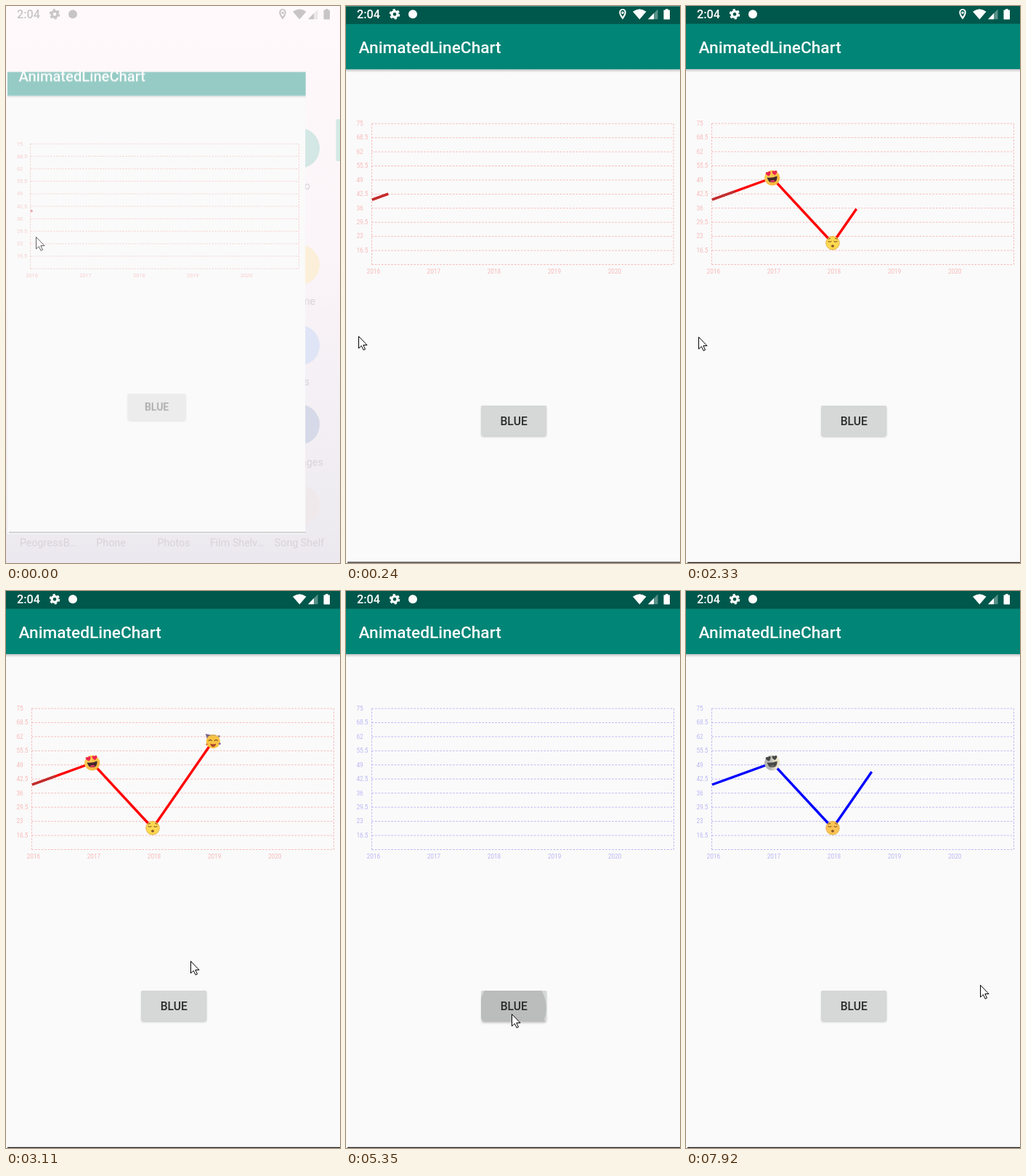
These frames come from a looping animation (460x768 px, 7990 ms). An HTML page:

```html
<!DOCTYPE html>
<html lang="en">
<head>
<meta charset="utf-8">
<title>Animated line chart</title>
<style>
  html, body { margin: 0; width: 100%; height: 100%; overflow: hidden; background: #fafafa; }
  svg { display: block; width: 100vw; height: 100vh; }
  text { font-family: Roboto, "Noto Sans", sans-serif; }
  .medium { font-weight: 500; }
  .label { font-size: 14.3px; fill: #d8d3d9; text-anchor: middle; }
  .axis { font-size: 8.2px; }
  .thin { fill: none; stroke-width: 1.1; stroke-linecap: round; }
  #grid { --ink: #f8b8b8; }
  #grid.blue { --ink: #b9b5f6; }
  #grid path { fill: none; stroke: var(--ink); stroke-dasharray: 2.5 1.97; }
  #grid text { fill: var(--ink); }
  #faces { --love: url(#gold); --heart: #ee2450; --mouth: #40282c; --tongue: #e8365c; --kiss: #fdd850; }
  #faces.blue { --love: url(#silver); --heart: #474747; --mouth: #484846; --tongue: #666; --kiss: #fcc455; }
</style>
</head>
<body>
<svg viewBox="0 0 460 768" preserveAspectRatio="none">
  <defs>
    <linearGradient id="wall" x2="0" y2="1">
      <stop offset="0" stop-color="#fff9fb"/><stop offset=".45" stop-color="#fbf4f8"/>
      <stop offset=".85" stop-color="#f0edf2"/><stop offset="1" stop-color="#ebe8ef"/>
    </linearGradient>
    <linearGradient id="drop" x2="0" y2="1">
      <stop offset="0" stop-opacity=".22"/><stop offset="1" stop-opacity="0"/>
    </linearGradient>
    <linearGradient id="gold" x2="1" y2="1">
      <stop offset="0" stop-color="#fdd35a"/><stop offset="1" stop-color="#f8b13a"/>
    </linearGradient>
    <linearGradient id="silver">
      <stop offset=".35" stop-color="#b4b4b2"/><stop offset=".75" stop-color="#ebe4cc"/>
    </linearGradient>
    <filter id="soft" x="-20%" y="-40%" width="140%" height="180%"><feGaussianBlur stdDeviation="1.5"/></filter>
    <clipPath id="reveal"><rect id="window" width="461.500" height="769"/></clipPath>
    <clipPath id="key"><rect id="cap" x="186" y="551" width="90.5" height="42" rx="2"/></clipPath>
    <path id="heart" d="M0 3.6C-6-.5-3-4.4 0-1.7C3-4.4 6-.5 0 3.6Z"/>
  </defs>

  <g id="home">
    <rect width="460" height="768" fill="url(#wall)"/>
    <rect x="454.500" y="156" width="8" height="58" rx="2" fill="#d2e9e5"/>
    <circle cx="404" cy="196" r="28" fill="#d3e7e4"/>
    <circle cx="404" cy="357" r="28" fill="#fcefd9"/>
    <circle cx="404" cy="468" r="28" fill="#dfe4f6"/>
    <circle cx="404" cy="577" r="28" fill="#d6d9e7"/>
    <circle cx="404" cy="688" r="28" fill="#f0e9eb"/>
    <g class="label">
      <text x="400" y="253">Demo</text>
      <text x="402" y="412">Volume</text>
      <text x="403" y="523">Files</text>
      <text x="404" y="634">Messages</text>
      <text x="58" y="745">PeogressB…</text>
      <text x="144.500" y="745">Phone</text>
      <text x="231" y="745">Photos</text>
      <text x="318" y="745">Film Shelv…</text>
      <text x="404" y="745">Song Shelf</text>
    </g>
  </g>

  <g id="app"><g clip-path="url(#reveal)">
    <rect width="462" height="770" fill="#fafafa"/>
    <g id="grid"></g>
    <g id="content">
      <rect y="87" width="462" height="4.500" fill="url(#drop)"/>
      <rect width="462" height="87" fill="#008577"/>
      <rect width="462" height="24.500" fill="#00574b"/>
      <text class="medium" x="17.500" y="65" font-size="22.700" fill="#fff">AnimatedLineChart</text>
      <path id="line" fill="none" stroke-width="3.400" stroke-linejoin="round"/>
      <path id="tail" fill="none" stroke="#bd3030" stroke-width="3.200"/>
      <g id="faces">
        <g transform="translate(118.700 237)">
          <circle r="10.600" fill="var(--love)"/>
          <path d="M-7-.5Q0 .6 6.800-2.500Q7.500 5.500 1 6.300Q-5.500 6.800-7-.5Z" fill="var(--mouth)"/>
          <path d="M-3.500 4.800Q0 1.500 4.300 4Q1 7.500-3.500 4.800Z" fill="var(--tongue)"/>
          <g fill="var(--heart)">
            <use href="#heart" transform="translate(-5.300 -5.900) rotate(-14)"/>
            <use href="#heart" transform="translate(3.400 -7.400) rotate(-8)"/>
          </g>
        </g>
        <g transform="translate(202 326.800)">
          <circle r="9.300" fill="var(--kiss)" stroke="#dfa540" stroke-width=".8"/>
          <path class="thin" stroke="#80562a" d="M-6-2.500Q-4-.5-2-2.500M2-2.500Q4-.5 6-2.500M-6-5.500L-3.500-6.300M6-5.500L3.500-6.300"/>
          <ellipse cy="4.200" rx="2" ry="1.700" fill="#8a5326"/>
        </g>
        <g transform="translate(285.300 207.500)">
          <path d="M-10.500-10.500L0-8.500L-8-2Z" fill="#77628a"/>
          <path d="M6-8.500L10-8L8-5Z" fill="#8b7a70"/>
          <circle r="9.700" fill="#fac343"/>
          <path d="M-7-6.500Q0-13 7-6.500Q0-8.500-7-6.500Z" fill="#d8b25e"/>
          <path class="thin" stroke="#6b4526" d="M-6-1Q-4-3.500-2-1M2-1Q4-3.500 6-1"/>
          <path d="M-4 3Q0 4.500 4 3Q3 7.500 0 7.500T-4 3Z" fill="#a84a2c"/>
          <circle cx="-8.500" cy="4" r="1.600" fill="#e58a3c"/><circle cx="9" cy="3" r="1.500" fill="#8a6ca0"/>
        </g>
        <g transform="translate(368.500 177)">
          <circle r="10.300" fill="url(#gold)"/>
          <path class="thin" stroke="#6b4526" d="M-6-2Q-4-4.500-2-2M2-2Q4-4.500 6-2M-4.500 3Q0 7 4.500 3"/>
        </g>
      </g>
      <rect id="shade" x="187" y="553" width="88.500" height="41" rx="2" filter="url(#soft)"/>
      <g clip-path="url(#key)">
        <rect x="186" y="551" width="91" height="42" fill="#d6d7d7"/>
        <circle id="ripple" cx="230" cy="575"/>
      </g>
      <text class="medium" x="231.300" y="577.700" font-size="15.700" text-anchor="middle" fill="#2b2b2b">BLUE</text>
      <rect x="2" y="766.800" width="460" height="1.200" fill="#1c1c1c"/>
    </g>
  </g></g>

  <g id="status">
    <text class="medium" x="15" y="17.300" font-size="16.200">2:04</text>
    <circle cx="67" cy="11.300" r="4" fill="none" stroke="currentColor" stroke-width="3.200"/>
    <circle cx="67" cy="11.300" r="6.300" fill="none" stroke="currentColor" stroke-width="2" stroke-dasharray="3.300 3.300"/>
    <circle cx="92" cy="11.300" r="6"/>
    <path id="pin" fill-rule="evenodd" d="M381 18.500C374 10.500 375.500 4 381 4S388 10.500 381 18.500ZM381 14.800C385.500 9 383.500 5.500 381 5.500S376.500 9 381 14.800ZM379.300 9.300a1.700 1.700 0 1 0 3.400 0a1.700 1.700 0 1 0-3.400 0Z"/>
    <path d="M395 7.800Q404.300.5 413.500 7.800L404.300 18.500Z"/>
    <path d="M416 18.300L429.500 4.500V18.300Z" opacity=".35"/>
    <path d="M416 18.300L424 10.100V18.300Z"/>
    <path d="M437.500 5.500H440V4H443.500V5.500H446V18.500H437.500Z"/>
  </g>
  <path id="cursor" d="M0 0V16.500L3.800 13L6.600 18.800L9 17.700L6.300 12H11.500Z" fill="#fff" stroke="#000" stroke-linejoin="round"/>
</svg>
<script>
const LOOP = 7990, STEP = 77.65, CLICK = 5190;
const $ = id => document.getElementById(id);
const set = (id, attrs) => { for (const k in attrs) $(id).setAttribute(k, attrs[k]); };
const clamp = v => Math.min(1, Math.max(0, v));
const mix = (a, b, p) => a + (b - a) * p;

// Vertices of the chart line
const points = [[36, 267], [118.700, 237], [202, 327], [285, 207], [368, 177]];

// Pointer stops: time, x, y
const stops = [
  [0, 41, 318], [220, 17, 455], [330, 17, 455], [400, 17, 456], [2380, 17, 456],
  [2800, 254, 510], [4505, 254, 510], [4735, 209, 605], [4815, 209, 605], [4970, 228, 583],
  [6050, 228, 583], [6320, 242, 555], [6830, 242, 555], [6985, 405, 543], [LOOP, 405, 543]
];

function buildGrid() {
  let d = "M35.5 162V356.5M451.5 162V356.5", labels = "";
  for (let i = 0; i <= 10; i++) {
    const y = 162 + i * 19.45;
    d += `M35.5 ${y}H451.5`;
    if (i < 10) labels += `<text class="axis" x="14.5" y="${y + 2.8}">${75 - i * 6.5}</text>`;
  }
  for (let i = 0; i < 5; i++)
    labels += `<text class="axis" x="${37.8 + i * 83.1}" y="369.3" text-anchor="middle">${2016 + i}</text>`;
  $("grid").innerHTML = `<path d="${d}"/>` + labels;
}

function pointer(t) {
  const i = Math.max(1, stops.findIndex(s => s[0] >= t));
  const [t0, x0, y0] = stops[i - 1], [t1, x1, y1] = stops[i];
  const p = clamp((t - t0) / (t1 - t0));
  return [mix(x0, x1, p), mix(y0, y1, p)];
}

function drawChart(t) {
  const blue = t >= CLICK;
  const u = Math.min(4, Math.max(0, blue ? (t - 5325) / 1000 : (t + 115) / 1005));
  const n = Math.floor(u), path = points.slice(0, n + 1);
  if (n < 4) {
    const e = .5 - .5 * Math.cos(Math.PI * (u - n));
    path.push(points[n].map((v, k) => mix(v, points[n + 1][k], e)));
  }
  const tip = Math.min(68, path[1][0]);
  set("line", { d: u > .05 ? "M" + path.join("L") : "", stroke: blue ? "#00f" : "#f00" });
  set("tail", { d: blue ? "" : `M36 267L${tip} ${267 - (tip - 36) * 30 / 82.7}` });
  set("grid", { class: blue ? "blue" : "" });
  set("faces", { class: blue ? "blue" : "" });
  [...$("faces").children].forEach((f, i) => f.style.display = i < n ? "" : "none");
}

function drawWindow(t) {
  const p = 1 - (1 - clamp(t / 290)) ** 3, q = 1 - p;
  set("app", { transform: `matrix(${1 - .111 * q} 0 0 ${1 - .115 * q} ${2 * q} ${46.7 * q})` });
  set("window", { y: p > .9 ? 0 : 50 * q });
  set("content", { opacity: clamp(.4 + .65 * p) });
  set("grid", { opacity: clamp(.7 + .4 * p) });
  set("cursor", { opacity: clamp(.6 + .5 * p) });
  $("home").style.display = p < .9 ? "" : "none";
  const tint = k => Math.round(mix(k, 255, clamp(p * 1.1)));
  const ink = `rgb(${tint(200)},${tint(197)},${tint(199)})`;
  $("status").style.color = ink;
  $("status").style.fill = ink;
  $("pin").style.display = t < 2480 ? "" : "none";
}

function drawButton(t) {
  const on = t >= CLICK && t < 5980;
  const fade = on ? 1 - clamp((t - 5440) / 400) : 0;
  set("ripple", { r: on ? 12 + 34 * clamp((t - CLICK) / 165) + clamp((t - 5358) / 100) * 14 : 0, "fill-opacity": .125 * fade });
  set("cap", { height: 42 - fade });
  set("shade", { "fill-opacity": .26, transform: `translate(0 ${1.2 * fade})` });
}

function draw(now) {
  const t = Math.floor((now % LOOP + 11) / STEP) * STEP;
  drawWindow(t);
  drawChart(t);
  drawButton(t);
  const [x, y] = pointer(t);
  set("cursor", { transform: `translate(${x + .5} ${y + .5})` });
}

buildGrid();
const start = performance.now();
function tick() {
  draw(performance.now() - start);
  requestAnimationFrame(tick);
}
tick();
</script>
</body>
</html>
```
